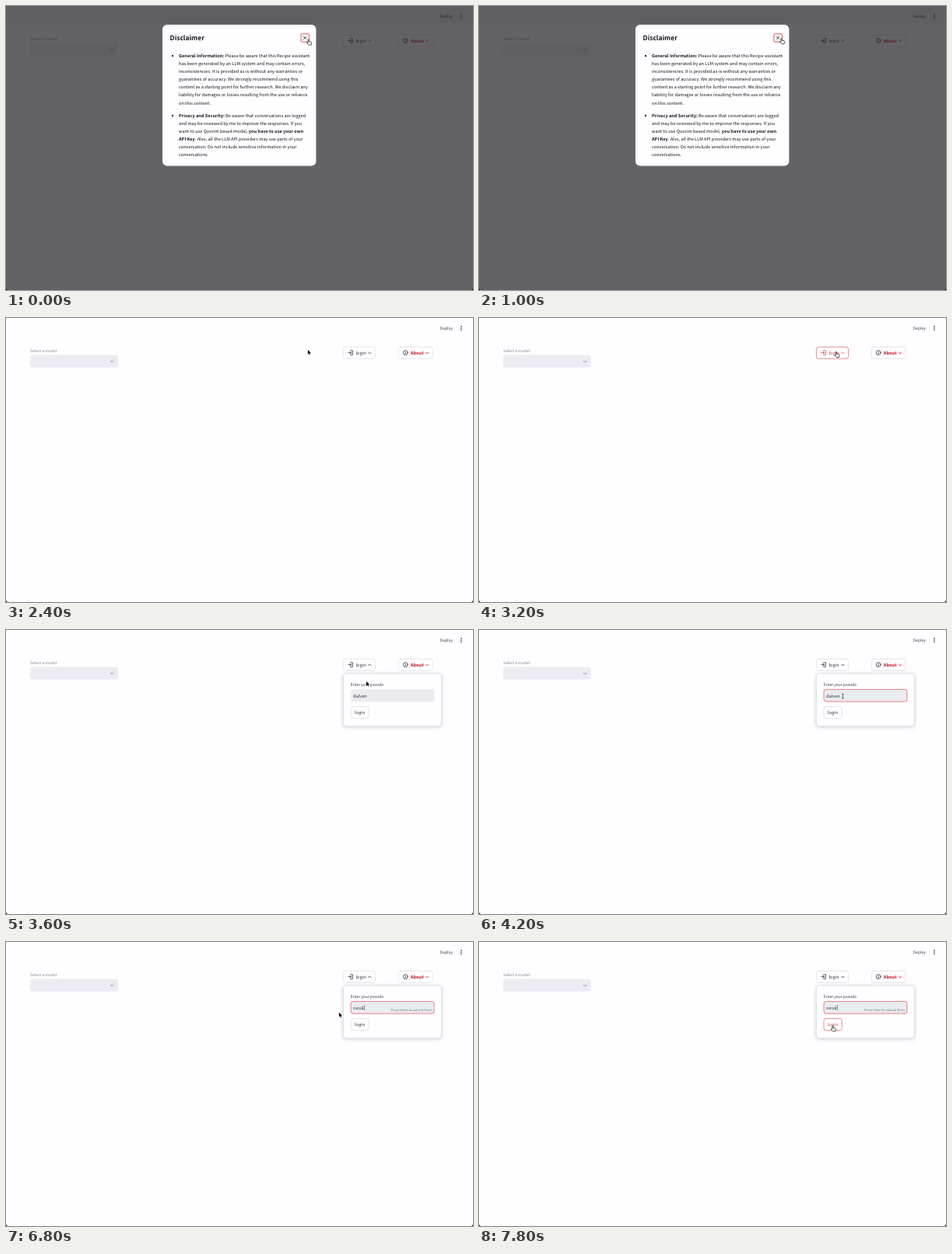
These frames come from a looping animation (600x365 px, 8000 ms). An HTML page:

```html
<!DOCTYPE html>
<html lang="en">
<head>
<meta charset="utf-8">
<title>Login walkthrough</title>
<style>
html, body { margin: 0; width: 100%; height: 100%; overflow: hidden; background: #fefdff; }
svg { display: block; width: 600px; height: 365px; }
text {
  font: 5.65px "Noto Sans CJK JP", "Noto Sans CJK SC", "Noto Sans", sans-serif;
  fill: #31333f; text-rendering: geometricPrecision; white-space: pre;
}
.b { font-weight: 600; }
.small { font-size: 4.94px; }
.hint { font-size: 4.23px; fill: #777983; }
.title { font-size: 8.47px; font-weight: 600; fill: #15161c; }
#dialog text { fill: #15161c; }
.box { fill: #fefdff; stroke: #d6d6dc; stroke-width: .6; }
.line { fill: none; stroke: #31333f; stroke-width: .8; stroke-linecap: round; stroke-linejoin: round; }
.red { fill: #bd1018 !important; }
.hover .box { stroke: #d9434a; }
.hover text { fill: #d9434a; }
.hover .line { stroke: #d9434a; }
#cursor path { stroke-linejoin: round; }
</style>
</head>
<body>
<svg viewBox="0 0 600 365">
  <rect width="600" height="365" fill="#fefdff"/>
  <text class="small" x="557.8" y="15">Deploy</text>
  <g fill="#31333f"><circle cx="585" cy="10.9" r=".8"/><circle cx="585" cy="13.2" r=".8"/><circle cx="585" cy="15.5" r=".8"/></g>

  <text class="small" x="31" y="43.5" style="fill:#83848c">Select a model:</text>
  <rect x="31" y="47.6" width="113" height="15.8" rx="3" fill="#ebecf2"/>
  <path class="line" d="M134.2 55l1.8 1.7 1.8-1.7" style="stroke:#777983"/>

  <g id="login">
    <rect class="box" x="433.4" y="37.2" width="41.2" height="15" rx="3"/>
    <path class="line" d="M442.6 41.8h2.7v5.6h-2.7M439.8 44.6h3.6M442 43l1.6 1.6-1.6 1.6"/>
    <text x="449.4" y="46.7">login</text>
    <path id="chevron" class="line"/>
  </g>
  <rect class="box" x="504.4" y="37.2" width="43.6" height="15" rx="3"/>
  <circle class="line" cx="513.2" cy="44.6" r="2.9"/>
  <path class="line" d="M513.2 44.4v1.7M513.2 43v.05"/>
  <text class="b red" x="519.8" y="46.7">About</text>
  <path class="line" d="M539.4 44.2l1.7 1.7 1.7-1.7" style="stroke:#bd1018"/>

  <g id="popover">
    <rect class="box" x="433.4" y="56" width="126" height="67.4" rx="4" style="filter:drop-shadow(0 1.5px 2.5px #0003)"/>
    <text class="small" x="442.8" y="71.8">Enter your pseudo</text>
    <rect id="field" x="443" y="76.4" width="107" height="15.6" rx="3" fill="#ebecf2" stroke-width=".8"/>
    <rect id="mark" y="80.6" height="8" fill="#b4d3f8"/>
    <text id="name" x="446" y="86.6"></text>
    <rect id="caret" y="81" width=".6" height="7" fill="#31333f"/>
    <text id="hint" class="hint" x="547" y="89.4" text-anchor="end">Press Enter to submit form</text>
    <g id="submit">
      <rect class="box" x="443" y="98.4" width="23.2" height="15.2" rx="3"/>
      <text x="447.9" y="108.2">login</text>
    </g>
  </g>

  <g id="dialog">
    <rect width="600" height="365" fill="#232327" opacity=".7"/>
    <rect width="600" height="22.5" opacity=".05"/>
    <rect x="201" y="24" width="197.4" height="181.6" rx="6" fill="#fefdff"/>
    <text class="title" x="210.6" y="44.2">Disclaimer</text>
    <rect x="379" y="35.8" width="10.4" height="10.4" rx="1.2" fill="#fefdff" stroke="#d9434a" stroke-width=".9"/>
    <path class="line" d="M382.5 39.3l3.3 3.3M385.8 39.3l-3.3 3.3" style="stroke:#15161c"/>
  </g>

  <path d="M0 362.8Q.2 364.8 2.2 365H0zM600 362.8Q599.8 364.8 597.8 365H600z"/>
  <g id="cursor">
    <path id="arrow" d="M0 0V5.6L1.3 4.5 2.2 6.4 3.2 5.9 2.3 4.1H4z" fill="#000" stroke="#fff" stroke-width=".5" paint-order="stroke"/>
    <path id="hand" d="M0 .7C0-.2 1.2-.2 1.2 .7V2.7L3.9 3.2Q4.9 3.5 4.7 4.8L4 7.2H1.1L-1.5 4.4Q-1.2 3.5 0 4.3z" fill="#fff" stroke="#111" stroke-width=".7"/>
    <path id="beam" d="M-1.2-3.2Q0-3.2 0-2.5Q0-3.2 1.2-3.2M0-2.5V2.5M-1.2 3.2Q0 3.2 0 2.5Q0 3.2 1.2 3.2" fill="none" stroke="#222" stroke-width=".7"/>
  </g>
</svg>
<script>
const $ = id => document.getElementById(id);
const show = (id, on) => $(id).style.display = on ? "" : "none";

// Dialog paragraphs; *stars* mark bold runs.
const paragraphs = [
  [65.9, ["*General Information:* Please be aware that this Recipe assistant",
    "has been generated by an LLM system and may contain errors,",
    "inconsistencies. It is provided as-is without any warranties or",
    "guarantees of accuracy. We strongly recommend using this",
    "content as a starting point for further research. We disclaim any",
    "liability for damages or losses resulting from the use or reliance",
    "on this content."]],
  [142.6, ["*Privacy and Security:* Be aware that conversations are logged",
    "and may be reviewed by me to improve the responses. If you",
    "want to use Quorim based model, *you have to use your own*",
    "*API Key*. Also, all the LLM API providers may use parts of your",
    "conversation. Do not include sensitive information in your",
    "conversations."]]
];
for (const [top, lines] of paragraphs) {
  let out = `<circle cx="214" cy="${top - 1.7}" r="1.1"/>`;
  lines.forEach((line, i) => {
    const runs = line.replace(/\*(.+?)\*/g, '<tspan class="b">$1</tspan>');
    out += `<text x="222" y="${top + i * 10.1}">${runs}</text>`;
  });
  $("dialog").insertAdjacentHTML("beforeend", out);
}

// Pointer path: time, x, y, shape from that time on.
const path = [
  [0, 388, 43, "hand"], [600, 388, 42, "hand"], [1400, 388, 41.2, "hand"],
  [2400, 387.8, 41, "arrow"], [2600, 387.8, 41, "arrow"],
  [3200, 458.4, 43.4, "hand"], [3400, 458.4, 43.4, "hand"],
  [3600, 463, 66, "arrow"], [3800, 467.4, 85, "beam"], [4200, 467.4, 85, "beam"],
  [5000, 421.5, 85, "beam"], [5400, 421.5, 85, ""], [6600, 421.5, 85, "arrow"],
  [7600, 453.6, 113, "arrow"], [7800, 453.8, 107.6, "hand"], [8000, 453.8, 107.6, "hand"]
];
function pointer(t) {
  const i = path.findIndex(p => p[0] > t) - 1;
  const [t0, x0, y0, shape] = path[i], [t1, x1, y1] = path[i + 1];
  const k = (t - t0) / (t1 - t0);
  return { x: x0 + (x1 - x0) * k, y: y0 + (y1 - y0) * k, shape };
}

const oldName = "dalven", newName = "nirok", step = 200;

function draw(now) {
  const t = Math.floor(now % 8000 / step) * step;
  const { x, y, shape } = pointer(t);
  const open = t >= 3400, typing = t >= 5400;

  show("dialog", t < 2400);
  show("popover", open);
  $("login").setAttribute("class", t >= 3200 && t < 3600 ? "hover" : "");
  $("chevron").setAttribute("d", open ? "M465.6 45.6l1.7-1.7 1.7 1.7" : "M465.6 44.2l1.7 1.7 1.7-1.7");
  $("field").setAttribute("stroke", t >= 3800 ? "#e2606a" : "#ebecf2");
  $("submit").setAttribute("class", t >= 7800 ? "hover" : "");

  const name = $("name");
  name.textContent = typing ? newName.slice(0, (t - 5400) / step) : oldName;
  const end = open ? 446 + name.getComputedTextLength() : 446;
  const from = Math.max(446, x);
  show("mark", t >= 4400 && !typing);
  $("mark").setAttribute("x", from);
  $("mark").setAttribute("width", Math.max(0, end - from));
  show("caret", typing);
  $("caret").setAttribute("x", end + .2);
  show("hint", typing);

  for (const s of ["arrow", "hand", "beam"]) show(s, s === shape);
  $("cursor").setAttribute("transform", `translate(${x} ${y})`);
  requestAnimationFrame(draw);
}
const start = performance.now();
requestAnimationFrame(function first(now) { draw(Math.max(0, now - start)); });
</script>
</body>
</html>
```
